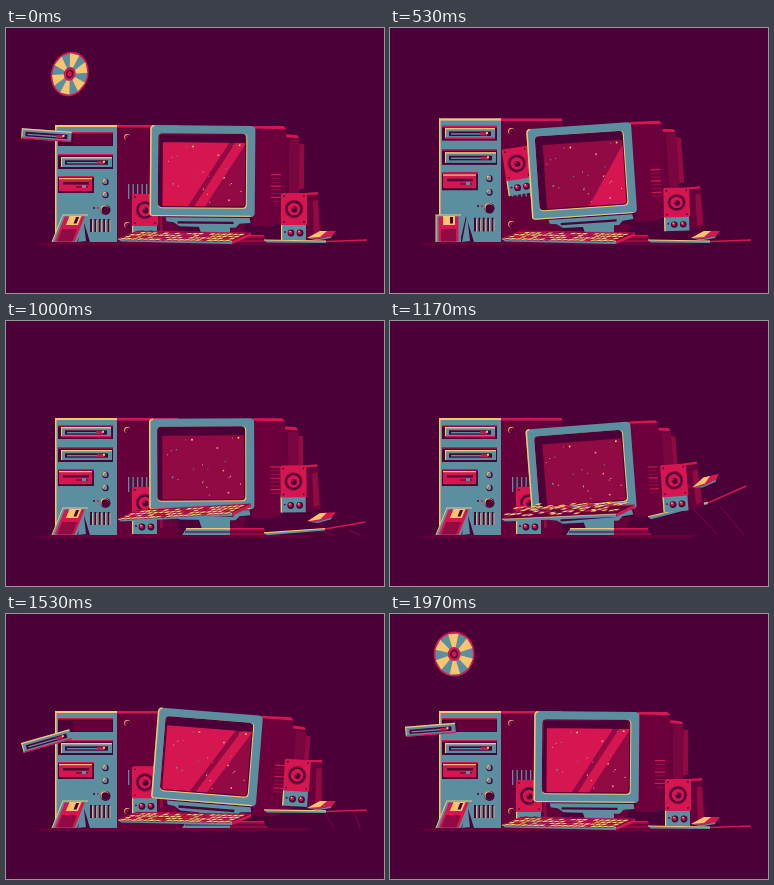
An HTML page that plays this animation: 378x265 px, repeating every 2010 ms.

```html
<!DOCTYPE html>
<html lang="en">
<head>
<meta charset="utf-8">
<title>Bouncing retro computer</title>
<style>
html, body { margin: 0; width: 100%; height: 100%; overflow: hidden; background: #4b0037; }
svg { display: block; width: 100vw; height: 100vh; }
</style>
</head>
<body>
<svg id="stage" viewBox="0 0 378 265"></svg>
<script>
const LOOP = 2010;
const C = { bg: '#4b0037', deep: '#66003a', wine: '#910a43', red: '#d61650', teal: '#5b8fa0', gold: '#fac56f' };

// Markup helpers
const poly = (pts, fill, id = '') => `<polygon ${id && `id="${id}"`} points="${pts}" fill="${fill}"/>`;
const rect = (x, y, w, h, fill, rx = 0) => `<rect x="${x}" y="${y}" width="${w}" height="${h}" fill="${fill}" rx="${rx}"/>`;
const dot = (x, y, r, fill) => `<circle cx="${x}" cy="${y}" r="${r}" fill="${fill}"/>`;
const stroke = (d, color, w = 1, id = '') => `<path ${id && `id="${id}"`} d="${d}" fill="none" stroke="${color}" stroke-width="${w}"/>`;
const group = (id, body) => `<g id="${id}">${body}</g>`;
const repeat = (n, fn) => Array.from({ length: n }, (_, i) => fn(i)).join('');
const noise = n => { const s = Math.sin(n * 91.7 + 3.1) * 4375.85; return s - Math.floor(s); };

function drive(x, y, w) {
  return rect(x, y, w, 10, C.teal) + rect(x, y, w, 1.3, C.gold) + rect(x, y, 1, 10, C.gold) +
    rect(x + 4, y + 3.3, w - 8, 4.4, C.bg) + rect(x + 6, y + 5, w - 20, 1.4, C.teal) +
    rect(x + w - 15, y + 4.2, 7, 2.8, C.red) + rect(x + w - 9, y + 3.8, 2, 2, C.gold);
}

const bay = (y, w, h) => rect(52, y, w, h, C.bg) + rect(52, y, w, 1.5, C.red);
const knob = (y, r, fill) => dot(99.5, y, r, C.bg) + dot(98.7, y - .8, r - 1, C.gold) + dot(99.3, y, r - 1.2, fill);
const screw = y => dot(121.2, y, 3, C.gold) + dot(121.8, y + .5, 2.7, C.bg) + dot(121.2, y, 1.4, C.wine);

function towerArt() {
  return rect(110, 97, 62, 117, C.deep) + rect(110, 97, 62, 2.5, C.red) +
    rect(49, 97, 62, 117, C.teal) + rect(49, 97, 62, 2, C.gold) + rect(49, 97, 1.5, 117, C.gold) +
    bay(104, 55, 14) + rect(67, 107, 39, 10, C.deep) +
    bay(126, 55, 15) + drive(55, 129, 51) +
    bay(148, 36, 17) + rect(53, 150, 33, 13, C.red) + rect(53, 150, 33, 1.2, C.gold) +
    rect(57, 154, 26, 2.5, C.bg) + rect(70, 158, 12, 2, C.wine) + rect(76, 157, 4, 3, C.teal) +
    knob(154, 3.2, C.teal) + knob(167, 3.2, C.teal) + knob(182, 5, C.bg) +
    dot(88, 180, 1, C.bg) + dot(92, 180, 1, C.red) +
    repeat(5, i => rect(84 + i * 4.4, 191, 2, 13, C.bg) + rect(86 + i * 4.4, 192, .7, 12, C.gold)) +
    screw(109) + screw(197) +
    repeat(5, i => rect(122 + i * 4.5, 156, 1.3, 15, C.teal));
}

function discArt() {
  const ray = a => `${21 * Math.cos(a)},${21 * Math.sin(a)}`;
  return dot(0, 0, 22.5, C.red) + dot(0, 0, 20.7, C.teal) +
    repeat(6, i => { const a = i * Math.PI / 3 + .2; return poly(`0,0 ${ray(a)} ${ray(a + .55)}`, C.gold); }) +
    dot(0, 0, 7, C.red) + dot(0, 0, 4.5, C.bg) + dot(0, 0, 2.6, C.red);
}

// Speakers stand on their origin, the bottom left corner
function speakerArt(depth) {
  return `<g transform="translate(0 -47)">` +
    poly(`24,0 ${24 + depth},-1 ${28 + depth},44 24,47`, C.deep) +
    poly(`24,0 ${24 + depth},-1 ${24 + depth},1.5 24,2`, C.red) +
    poly(`${24 + depth * .6},8 ${24 + depth},7 ${26 + depth},40 ${25 + depth * .6},42`, C.wine) +
    rect(0, 30, 25, 17, C.teal) + rect(0, 32, 1.2, 15, C.gold) +
    rect(0, 0, 26, 32, C.red, 1.5) + dot(13, 16, 9.3, C.wine) + dot(13, 16, 8.2, C.bg) +
    dot(13, 16, 6.3, C.red) + dot(13.5, 16.5, 3, C.bg) + dot(12, 15, 1, C.red) +
    repeat(4, i => dot(3 + 20 * (i % 2), 3 + 26 * (i >> 1), .9, C.bg)) +
    repeat(2, i => dot(10 + 9 * i, 40, 3.4, C.bg) + dot(9.4 + 9 * i, 39.4, 2, C.red) + dot(9 + 9 * i, 38.5, .8, C.gold)) +
    dot(4, 39, .9, C.bg) + `</g>`;
}

function bodyArt() {
  return poly('44,17 50,18 50,62 44,64', C.wine) +
    poly('30,8 43,9 45,12 45,88 30,94', C.deep) + poly('30,8 43,9 45,12 30,11', C.red) +
    poly('35,14 45,13 45,86 35,90', '#790641') +
    poly('0,0 29,0 32,3 32,94 20,100 -2,100', '#6b003c') + poly('0,0 29,0 32,3 0,2.5', C.red) +
    repeat(8, i => rect(17, 48 + i * 3.8, 10, 1.2, i % 3 ? C.wine : C.red));
}

function screenArt() {
  const band = (a, b) => poly(`${a},81 ${b},81 ${b + 46},9 ${a + 46},9`, C.red);
  return poly('16,92 100,92 101,97 90,98 86,102 30,101 24,97 17,96', C.teal) +
    rect(28, 96, 56, 2.3, C.bg) +
    rect(0, 0, 105, 91, C.teal, 4) +
    stroke('M2 90Q0 90 .6 86V4Q.6 .6 4 .6', C.gold, 1.5) + stroke('M2 90.4H101', C.gold, 1.1) +
    rect(8, 8, 89, 75, C.gold, 4) + rect(8, 8, 88, 74, C.bg, 4) +
    `<clipPath id="glass"><rect x="9" y="9" width="86" height="72" rx="3"/></clipPath>
    <g clip-path="url(#glass)">${rect(9, 9, 86, 72, C.wine) +
      group('glare', band(0, 100) + band(106, 117)) +
      stroke('', C.bg, 16, 'shade') +
      repeat(24, i => dot(18 + 75 * noise(i), 19 + 59 * noise(i + 50), i % 5 ? .6 : 1,
        [C.gold, C.teal, '#e98a86'][i % 3]))}</g>`;
}

// Keyboard coordinates start at its front left corner
const COLS = 19, ROWS = 4;
function keyArt(i) {
  const row = Math.floor(i / COLS), x = 18 - row * 4.6 + (i % COLS) * 5.8, y = -7 + row * 2 + (i % COLS) * .1;
  const cap = dy => `${x},${y + dy} ${x + 4.8},${y + dy} ${x + 1.8},${y + dy + 1.4} ${x - 3},${y + dy + 1.4}`;
  return `<g class="key">${poly(cap(.7), C.wine)}${poly(cap(0), noise(i) > .82 ? C.red : C.gold)}</g>`;
}

function keyboardArt() {
  return poly('0,0 19,-8 133,-6 114,2', C.deep) + stroke('M0 0L19 -8L133 -6', C.red, .7) +
    poly('0,0 114,2 114,5 3,2.5', C.teal) + poly('114,2 133,-6 133,-3 114,5', C.red) +
    stroke('M0 0L114 2', C.gold, .7) + repeat(COLS * ROWS, keyArt);
}

const stage = document.getElementById('stage');
stage.innerHTML =
  rect(0, 0, 378, 265, C.bg) + poly('26,216 46,214 308,214 300,217 40,217', C.deep) +
  group('tower', towerArt() + group('disc', discArt()) +
    group('tray', drive(-25, -5, 50) + rect(-25, 4, 50, 1.4, C.red))) +
  poly('76,188 84,214 70,214', C.bg) + poly('77,187 80,213 72,214', C.teal) +
  group('floppy', rect(0, -27, 25, 27, C.teal) + rect(2.5, -25.5, 20, 25, C.red) + rect(7, -26, 12, 9, C.gold) +
    rect(14, -25, 3, 6.5, C.bg) + rect(5, -13, 15, 12.5, C.wine) + stroke('M0 0V-27H25', C.gold)) +
  group('leftSpeaker', speakerArt(5)) +
  poly('192,196 224,196 224,208 196,208', C.teal) + poly('224,196 240,196 236,208 224,208', C.deep) +
  poly('176,214 180,208 224,208 224,214', C.teal) + poly('224,208 258,208 262,214 224,214', C.wine) +
  rect(180, 207, 44, 1.3, C.gold) + rect(224, 207, 34, 1.3, C.red) + rect(179, 210.5, 82, 1, C.bg) +
  group('body', bodyArt()) + group('screen', screenArt()) +
  stroke('', C.wine, .8, 'cords') +
  poly('', C.teal, 'padEdge') + stroke('', C.gold, 1.2, 'padFront') + stroke('', C.red, 1.5, 'padRight') +
  group('rightSpeaker', speakerArt(13)) +
  group('mouse', poly('-15,4 -2,-3 14,-3 10,2 -4,5', C.red) + poly('-15,4 -2,-3 5,-3 -2,3', C.gold) +
    poly('-15,4 -4,5 10,2 9,4 -5,6.5', C.teal)) +
  group('keyboard', keyboardArt());

const el = {};
stage.querySelectorAll('[id]').forEach(node => el[node.id] = node);
const keys = [...stage.querySelectorAll('.key')];
const set = (id, name, value) => el[id].setAttribute(name, value);
const move = (id, value) => set(id, 'transform', value);

// Motion rules
function ramp(t, from, to) {
  const u = Math.min(1, Math.max(0, (t - from) / (to - from)));
  return u * u * (3 - 2 * u);
}
function hop(t, from, to, height) {
  const u = (t - from) / (to - from);
  return u > 0 && u < 1 ? 4 * height * u * (1 - u) : 0;
}
// Damped sway in degrees, set off by the impact and stopped before the loop ends
function sway(t) {
  return -7.5 * Math.exp((330 - t) / 2000) * Math.cos(2 * Math.PI * (t - 430) / 740) *
    ramp(t, 200, 330) * (1 - ramp(t, 1550, 1850));
}

function drawTower(t) {
  const stretch = 1 - .2 * ramp(t, 200, 330) + .28 * ramp(t, 330, 575) - .08 * ramp(t, 600, 1000);
  move('tower', `translate(0 ${214 * (1 - stretch)}) scale(1 ${stretch})`);

  const out = 1 - ramp(t, 200, 300) + ramp(t, 1430, 1525);
  const drop = -4 * (1 - ramp(t, 0, 200)) + 16 * ramp(t, 1440, 1530) - 16 * ramp(t, 1560, 2200) + hop(t, 280, 420, 3);
  move('tray', `translate(${80 - 39.5 * out} ${111 + drop}) rotate(${-drop})`);

  const fall = (t < 1000 ? t + LOOP : t) - 1870, part = fall / 344;
  set('disc', 'visibility', Math.abs(part) < .98 ? 'visible' : 'hidden');
  move('disc', `translate(${64.3 - 20 * part ** 4} ${34 + .0006 * fall * fall})
    rotate(${(fall - 100) * .4}) scale(${Math.cos(fall * .0042)} 1)`);

  const lean = 1 - hop(t, 360, 700, 1);
  move('floppy', `translate(46 214) skewX(${-22 * lean})`);
}

function drawMonitor(t) {
  const sag = hop(t, 230, 430, 10) + hop(t, 1050, 1300, 5), tilt = sway(t) + .5;
  const place = `translate(${196 + 1.1 * tilt} ${143 + sag}) rotate(${tilt}) scale(1 ${1 - sag * .008}) translate(-52.5 -45.5)`;
  move('screen', place);
  move('body', `${place} translate(104 0) skewY(${-.35 * tilt}) scale(${1 - sag * .02} 1)`);
  move('glare', `translate(${9 + (t < 1000 ? .225 * t - 71 : -200 + 129 * ramp(t, 1200, 1530))} 0)`);
  const edge = 5 - tilt * .6;
  set('shade', 'd', `M${edge} 90V9H100`);
}

function drawKeyboard(t) {
  const lift = hop(t, 530, 1650, 13), slope = hop(t, 530, 1480, 9) / 125 * 180 / Math.PI;
  move('keyboard', `translate(112 ${211 - lift}) skewY(${-slope})`);
  const toss = hop(t, 1000, 1400, 7);
  keys.forEach((key, i) => key.setAttribute('transform', `translate(0 ${-toss * (.25 + .75 * noise(i + 9))})`));
}

function drawSpeakers(t) {
  const toss = hop(t, 330, 870, 48), small = hop(t, 1300, 1700, 14);
  move('leftSpeaker', `translate(${126 - toss * .16} ${213 - toss - small}) rotate(${-toss * .2})`);

  const lift = hop(t, 500, 1080, 43) + hop(t, 1000, 1700, 28);
  const turn = sway(t) * Math.min(1, lift / 30), squash = 1 - .18 * ramp(t, 220, 320) * (1 - ramp(t, 430, 620));
  move('rightSpeaker', `translate(${275 + turn * .4} ${212 - lift}) rotate(${turn * 1.3}) scale(1 ${squash})`);
}

function drawPad(t) {
  const lift = hop(t, 1000, 1700, 22), flick = hop(t, 950, 1500, 32);
  const leftY = 212 - lift, midY = 213 - lift - flick / 2, rightY = 212 - lift - flick, midX = 320 - flick * .07;
  set('padEdge', 'points', `258,${leftY} ${midX},${midY} ${midX},${midY + 2} 261,${leftY + 2.5}`);
  set('padFront', 'd', `M258 ${leftY}L${midX} ${midY}`);
  set('padRight', 'd', `M${midX} ${midY + .5}L${361 - flick * .15} ${rightY}`);
  move('mouse', `translate(316 ${206 - lift - flick}) rotate(${-flick * .45})`);

  const cord = (x, footX) => `M${x - flick * .6} ${midY + flick * .1}L${footX} 214`;
  const slack = hop(t, 500, 1080, 36);
  set('cords', 'd', (lift ? cord(318, 328) + cord(348, 354) : '') +
    (slack ? `M304 ${213 - slack}L318 204` : ''));
}

const start = performance.now();
function tick() {
  const t = (performance.now() - start) % LOOP;
  [drawTower, drawMonitor, drawKeyboard, drawSpeakers, drawPad].forEach(draw => draw(t));
  requestAnimationFrame(tick);
}
tick();
</script>
</body>
</html>
```
